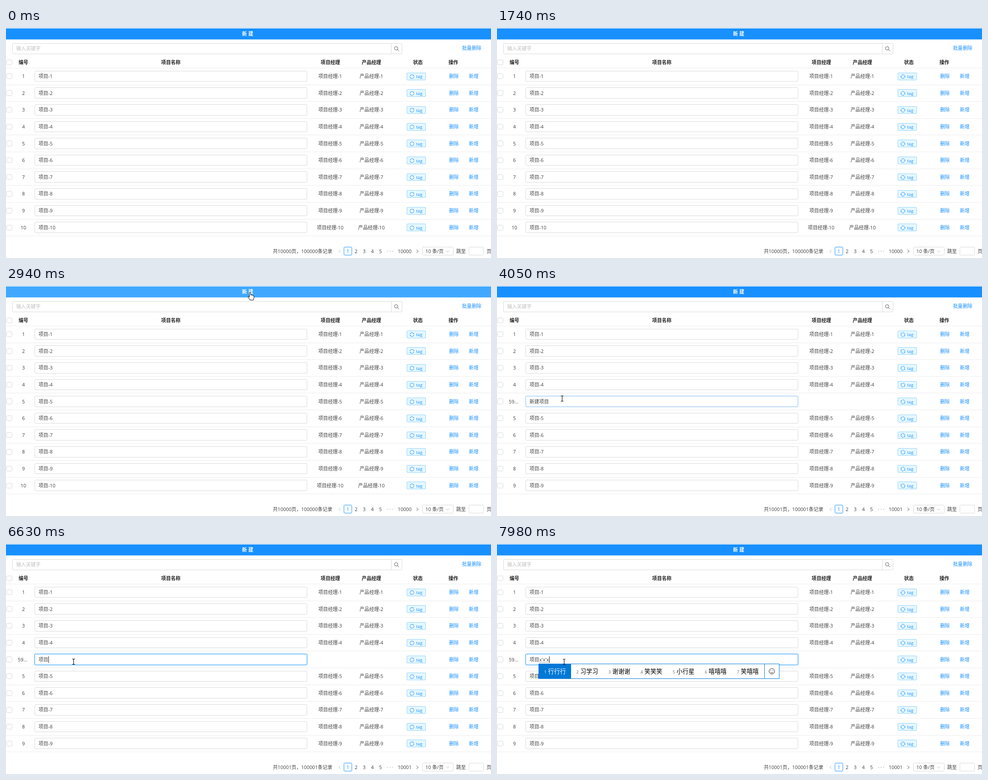
An HTML page that plays this animation: 1087x515 px, repeating every 8 s.

```html
<!DOCTYPE html>
<html>
<head>
<meta charset="utf-8">
<style>
  html, body { margin: 0; width: 100%; height: 100%; overflow: hidden; background: #fff; }
  svg { display: block; width: 100%; height: 100%; }
  text { font: 10.85px "Open Sans", "Noto Sans CJK SC", "Noto Sans CJK", sans-serif; fill: #404040; white-space: pre; }
  .mid { text-anchor: middle; }
  .head { font-weight: 700; fill: #222; }
  .link { fill: #1890ff; }
  .hint { fill: #bfbfbf; }
  .tag { font-size: 9.6px; fill: #1890ff; }
  .cand { font-size: 13.3px; font-weight: 500; fill: #000; }
  .num { font-size: 9.2px; fill: #666; }
  .on { fill: #fff; }
  .box { fill: #fff; stroke: #d9d9d9; }
  .line { fill: none; stroke: #555; }
</style>
</head>
<body>
<svg viewBox="0 0 1087 515" preserveAspectRatio="none">
  <defs>
    <g id="sync"><g id="spin">
      <g id="half">
        <path d="M-4.4 .4A4.4 4.4 0 0 1 3.3-2.9" fill="none" stroke="#1890ff" stroke-width=".9"/>
        <path d="M4.2-4.1V-1.6L2-2.2Z" fill="#1890ff"/>
      </g>
      <use href="#half" transform="rotate(180)"/>
    </g></g>
    <path id="arrow" d="M0 0V12.5L3 9.7 4.9 14 7 13.1 5.1 9H9Z" fill="#fff" stroke="#000" stroke-width=".9"/>
    <path id="hand" d="M-1.4 1.2Q0-1 1.4 1.2V6.2Q3.2 5 4 6.7 5.8 5.8 6.5 7.5 8.8 6.8 8.8 9.2V12.3L7.2 17.5H-.2L-4 11.6Q-4.9 8.8-2.8 9.4L-1.4 11Z" fill="#fff" stroke="#000"/>
    <path id="beam" d="M-3-6H-1L0-5 1-6H3M0-5V5M-3 6H-1L0 5 1 6H3" fill="none" stroke="#000" stroke-width="1.1"/>
  </defs>
  <g id="page"></g>
  <g id="before"></g>
  <g id="after"></g>
  <g id="live"></g>
</svg>
<script>
const LOOP = 8000, PITCH = 37.63, NEW_ROW = 4;
const $ = id => document.getElementById(id);
const rowY = i => 108 + i * PITCH;
const text = (x, y, s, cls = '') => `<text x="${x}" y="${y + 4}" class="${cls}">${s}</text>`;
const rect = (x, y, w, h, attrs = 'class="box"') =>
  `<rect x="${x}" y="${y}" width="${w}" height="${h}" ${attrs}/>`;
const path = (d, attrs = 'class="line"') => `<path d="${d}" ${attrs}/>`;

// Outlined box centred on y, its edges snapped to whole pixels
function snapBox(x, w, y, half, attrs = 'class="box" rx="2"', grow = 0) {
  const top = Math.round(y - half) - grow, bottom = Math.round(y + half) + grow;
  return rect(x - grow, top + .5, w + 2 * grow, bottom - top - 1, attrs);
}
const check = y => snapBox(1.5, 12, y, 6.14);
const field = (y, attrs, grow) => snapBox(64.5, 610, y, 12.29, attrs, grow);
const rule = y => path(`M0 ${Math.floor(y) + .5}H1087`, 'stroke="#ececec"');

// Linear track through [time, ...values] points
function track(points, t) {
  let i = 1;
  while (i < points.length - 1 && points[i][0] < t) i++;
  const [a, b] = [points[i - 1], points[i]];
  const f = Math.min(1, Math.max(0, (t - a[0]) / (b[0] - a[0])));
  return a.slice(1).map((v, j) => v + (b[j + 1] - v) * f);
}

function pageFrame() {
  const heads = [[39, '编号'], [369.5, '项目名称'], [727, '项目经理'], [819, '产品经理'], [923, '状态'], [1002.5, '操作']];
  return rect(14.5, 34.5, 873, 23.5, 'class="box" rx="2"') +
    path('M863.5 35V58', 'stroke="#d9d9d9"') +
    text(23, 46, '输入关键字', 'hint') +
    '<circle cx="874.5" cy="45.5" r="3.8" class="line"/>' + path('M877.3 48.3L880.8 51.8') +
    text(1022, 45, '批量删除', 'link') +
    check(77) + heads.map(([x, s]) => text(x, 77.3, s, 'mid head')).join('') + rule(89);
}

function tableRow(n, i) {
  const y = rowY(i), isNew = n === null;
  return check(y) +
    text(isNew ? 37 : 39, y, isNew ? '59...' : n, 'mid') + field(y) +
    (isNew ? '' : text(73, y, '项目-' + n) +
      text(726.5, y, '项目经理-' + n, 'mid') + text(819, y, '产品经理-' + n, 'mid')) +
    snapBox(898.5, 42, y + .2, 8.45, 'fill="#e6f7ff" stroke="#91d5ff" rx="1.5"') +
    `<use href="#sync" x="909.8" y="${y + .8}"/>` +
    text(919.2, y + .4, 'tag', 'tag') +
    text(993, y, '删除', 'link') + text(1037.5, y, '新增', 'link') +
    rule(y + 19.1);
}

function pager(pages, total) {
  const y = 499.5;
  return text(598, y, `共${pages}页，${total}条记录`) +
    path('M750 496.5L746 500 750 503.5', 'class="line" style="stroke:#bfbfbf"') +
    rect(757.5, 490.5, 17.5, 18, 'fill="#fff" stroke="#1890ff" rx="2"') +
    [1, 2, 3, 4, 5].map(n => text(747.9 + n * 18.3, y, n, n === 1 ? 'mid link' : 'mid')).join('') +
    [855.5, 861, 866.5].map(x => `<circle cx="${x}" cy="500" r="1.1" fill="#bfbfbf"/>`).join('') +
    text(893.5, y, pages, 'mid') +
    path('M920 496.5L924 500 920 503.5') +
    rect(933.5, 490.5, 69, 18, 'class="box" rx="2"') + text(940, y, '10 条/页') +
    path('M986.5 498.5L990 502 993.5 498.5', 'class="line" style="stroke:#bfbfbf"') +
    text(1009, y, '跳至') + rect(1037.5, 490.5, 33, 18, 'class="box" rx="2"') + text(1077, y, '页');
}

const rows = Array.from({ length: 10 }, (_, i) => i + 1);
const rowsAfter = [...rows.slice(0, NEW_ROW), null, ...rows.slice(NEW_ROW, 9)];
$('page').innerHTML = pageFrame();
$('before').innerHTML = rows.map(tableRow).join('') + pager(10000, 100000);
$('after').innerHTML = rowsAfter.map(tableRow).join('') + pager(10001, 100001);

const CURSOR = [[1890, 640, 450], [2040, 622, 380], [2500, 568, 120], [2800, 547, 14], [3480, 547, 14],
  [4050, 146, 252], [4450, 97, 259], [4600, 96, 259], [5000, 66, 264], [5200, 45.5, 273.5],
  [5600, 45.5, 273.5], [6200, 151.5, 263.5], [7560, 151.5, 263.5], [7700, 150.5, 264]];
const SPIN = [[0, 0], [1740, 585], [2840, 1100], [4050, 1520], [5280, 1980], [6630, 2510], [7980, 2930]];
const INSERT = 3480, FOCUS = 4600, ERASE = 5800, CLICK = 6400;
const TYPING = [[7100, 'x', '下 想 小 需 写 新 向'],
  [7400, "x'x", '谢谢 学习 信息 休息 消息 小学 形象'],
  [7700, "x'x'x", '行行行 习学习 谢谢谢 笑笑笑 小行星 嘻嘻嘻 笑嘻嘻']];

function popup(words) {
  let x = 93;
  const cells = words.split(' ').map((w, i) => {
    const at = x, width = 32.1 + 13.3 * w.length, on = i ? '' : ' on';
    x += width;
    return (i ? '' : rect(93, 268, Math.round(width + 1), 34, 'fill="#0078d7"')) +
      text(at + 12.8, 285.5, i + 1, 'num' + on) + text(at + 21.6, 286, w, 'cand' + on);
  });
  x = Math.round(x + 1.5);
  return rect(93.5, 268.5, x - 60, 33, 'fill="#fff" stroke="#0078d7"') + cells.join('') +
    path(`M${x + .5} 268V302`, 'stroke="#0078d7"') +
    `<g transform="translate(${x + 17} 285)" fill="none" stroke="#222"><circle r="6.2"/>` +
    path('M-3.4 1.5Q0 5.4 3.4 1.5M-2.2-2.6V-1M2.2-2.6V-1', '') + '</g>';
}

function newField(t, cx) {
  const y = rowY(NEW_ROW), typed = TYPING.filter(k => k[0] <= t).pop();
  const comp = typed ? typed[1] : '';
  const name = t < ERASE ? '新建项目' : '项目';
  const selFrom = t < FOCUS || t >= ERASE || cx > 90 ? 2 : cx > 79 ? 1 : 0;
  let out = '';
  if (selFrom < 2) out += rect(73 + selFrom * 10.85, 250.5, (2 - selFrom) * 10.85, 16.5, 'fill="#1890ff"');
  const chars = [...name].map((c, i) => i >= selFrom && i < 2 ? `<tspan class="on">${c}</tspan>` : c);
  out += text(73, y, chars.join('') + comp);
  const count = c => comp.split(c).length - 1;
  const caret = t >= ERASE && t < CLICK ? 73.5 : 95.5 + 5.7 * count('x') + 2.4 * count("'");
  if (comp) out += path(`M95 265.5H${caret}`, 'stroke="#555" stroke-dasharray="1 1"');
  const blink = comp || (t - 6300 + LOOP * 1.06) % 1060 < 530;
  if (t >= FOCUS && selFrom === 2 && blink) out += path(`M${caret} 251.5V266`, 'stroke="#111"');
  return out + (typed ? popup(typed[2]) : '');
}

function draw(t) {
  const [x, y] = track(CURSOR, t), shown = t >= CURSOR[0][0];
  const overButton = shown && y < 25, focused = t >= FOCUS;
  const near = Math.round((y - rowY(0)) / PITCH);
  const overInput = shown && x > 64 && x < 675 && near >= 0 && Math.abs(y - rowY(near)) < 12.5;
  const overSearch = y > 34 && y < 58 && x < 863;

  $('spin').setAttribute('transform', `rotate(${track(SPIN, t)[0] % 360})`);
  $('before').style.display = t < INSERT ? '' : 'none';
  $('after').style.display = t < INSERT ? 'none' : '';

  let out = rect(0, 1, 1087, 24.58, `fill="${overButton ? '#40a9ff' : '#1890ff'}"`) +
    text(534.5, 13, '新', 'mid head on') + text(548.7, 13, '建', 'mid head on');
  if (focused || overInput) {
    const rowAt = rowY(focused ? NEW_ROW : near);
    if (focused) out += field(rowAt, 'fill="none" stroke="#1890ff" stroke-opacity=".3" rx="2"', 1);
    out += field(rowAt, `fill="none" stroke="#40a9ff" stroke-opacity="${focused ? 1 : .6}" rx="2"`);
  }
  if (t >= INSERT) out += newField(t, x);
  if (shown) {
    const kind = overButton ? 'hand' : overInput || overSearch ? 'beam' : 'arrow';
    out += `<use href="#${kind}" x="${x}" y="${y}"/>`;
  }
  $('live').innerHTML = out;
}

let last = -1;
const start = performance.now();
function tick() {
  const unit = Math.floor((performance.now() - start) % LOOP / 30);
  const step = Math.ceil((unit + .8) / 4.51) - 1;
  if (step !== last) {
    last = step;
    draw(30 * Math.floor(step * 4.51 + .2));
  }
  requestAnimationFrame(tick);
}
tick();
</script>
</body>
</html>
```
